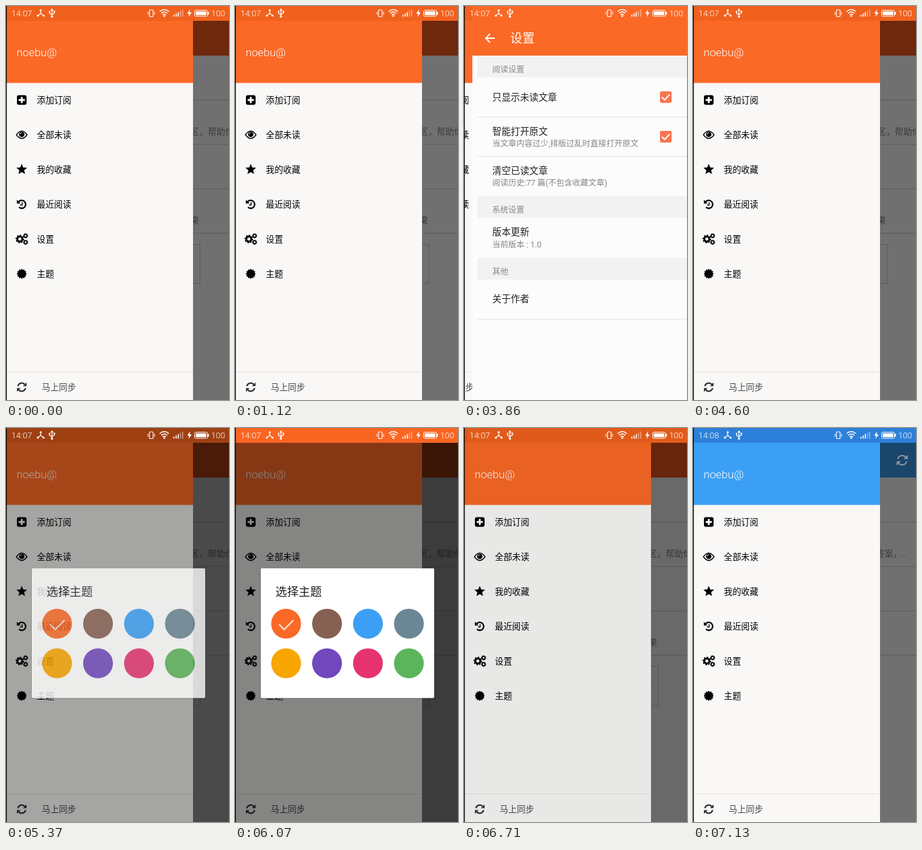
Write an HTML page that moves like this. It is 347 by 612 pixels and loops after 8000 ms.

```html
<!DOCTYPE html>
<html lang="zh-CN">
<head>
<meta charset="utf-8">
<style>
html, body { margin: 0; width: 100%; height: 100%; overflow: hidden; background: #000; }
svg { display: block; }
text { font-family: Roboto, "Noto Sans CJK SC", "Noto Sans CJK", sans-serif; white-space: pre; }
</style>
</head>
<body>
<svg id="stage" width="347" height="612" viewBox="0 0 347 612"></svg>
<script>
const rect = (x, y, w, h, fill, more = '') =>
  `<rect x="${x}" y="${y}" width="${w}" height="${h}" fill="${fill}" ${more}/>`;
const text = (x, y, size, fill, s, more = '') =>
  `<text x="${x}" y="${y}" font-size="${size}" fill="${fill}" ${more}>${s}</text>`;
const disc = (x, y, r, fill) => `<circle cx="${x}" cy="${y}" r="${r}" fill="${fill}"/>`;
const line = (d, color, width, more = '') =>
  `<path d="${d}" fill="none" stroke="${color}" stroke-width="${width}" ${more}/>`;
const shape = (d, fill) => `<path d="${d}" fill="${fill}"/>`;
const at = (x, y, body, more = '') => `<g transform="translate(${x} ${y}) ${more}">${body}</g>`;
const group = (id, body) => `<g id="${id}">${body}</g>`;

// Star with n tips
function burst(n, outer, inner) {
  let d = '';
  for (let i = 0; i < 2 * n; i++) {
    const a = Math.PI * i / n, r = i % 2 ? inner : outer;
    d += `${i ? 'L' : 'M'}${(r * Math.sin(a)).toFixed(2)} ${(-r * Math.cos(a)).toFixed(2)}`;
  }
  return shape(d + 'Z', '#000');
}

const gear = (x, y, r) => at(x, y,
  `<g fill="none" stroke="#000"><circle r="${r * .6}" stroke-width="${r * .46}"/>
  <circle r="${r * .87}" stroke-width="${r * .3}" pathLength="16" stroke-dasharray="1 1"/></g>`);

function refresh(color, width) {
  const half = line('M-6 -1.5A6.2 6.2 0 0 1 4.7 -4.2', color, width) +
    shape('M7.5 -7.3V-1.5H1.7Z', color);
  return half + `<g transform="rotate(180)">${half}</g>`;
}

const icons = [
  rect(-7.5, -7.5, 15, 15, '#000', 'rx="3"') + line('M-4.8 0H4.8M0 -4.8V4.8', '#fff', 2.8),
  line('M-8.3 0Q0 -11.5 8.3 0Q0 11.5 -8.3 0Z', '#000', 1.4) + disc(0, -.6, 4.2, '#000') +
    line('M-2.3 -.8A2.4 2.4 0 0 1 0 -3', '#fff', 1),
  burst(5, 8.8, 3.9),
  line('M-5.2 -3.4A6.2 6.2 0 1 1 -4.4 4.5', '#000', 2.3) + shape('M-7.6 -7V-1.2H-1.8Z', '#000') +
    line('M.6 -3.3V1H-2.6', '#000', 1.4),
  gear(-3, 0, 6.6) + gear(6, -5, 3.9) + gear(6, 5, 3.9),
  burst(12, 8, 6.2)
];
const labels = ['添加订阅', '全部未读', '我的收藏', '最近阅读', '设置', '主题'];

function home(theme) {
  const edge = [146, 215, 284, 353].map(y => rect(291, y - .5, 56, 1, '#5a5a5a')).join('');
  const rows = labels.map((s, i) =>
    at(24.5, 146 + 54 * i, icons[i]) + text(48, 151 + 54 * i, 13.4, '#000', s)).join('');
  return rect(0, 0, 347, 612, '#707070') + rect(0, 23, 347, 54, theme.dark) + edge + theme.extra +
    rect(0, 0, 347, 23, theme.status) +
    rect(0, 23, 291, 589, '#f9f8f6') + rect(0, 23, 291, 96.5, theme.main) +
    text(16.5, 78, 17.2, '#fff', 'noebu@', 'font-weight="300"') +
    (theme.press || '') + rows + rect(0, 568, 291, 1, '#e3e2e0') +
    at(24.5, 592, refresh('#333', 2.3)) + text(55.5, 597, 13.4, '#444', '马上同步');
}

const orange = {
  main: '#fb6926', status: '#f0611d', dark: '#6e280c',
  press: `<rect id="press" x="0" width="291" height="54" fill="#d9d8d6"/>`,
  extra: text(287, 200, 13.5, '#3c3c3c', '区，帮助你') + text(287, 338, 13.5, '#3c3c3c', '果') +
    rect(240.5, 370.5, 61.5, 60.5, 'none', 'stroke="#5a5a5a"') + rect(291, 400, 3, 1, '#5a5a5a')
};
const blue = {
  main: '#3ba0f5', status: '#2d80d9', dark: '#1a466b',
  extra: at(325.5, 50, refresh('#8f979e', 1.6), 'scale(1.15)') +
    text(284.5, 200, 13.5, '#3c3c3c', '答案，..')
};

function settings() {
  const band = (y, s) => rect(9, y, 332, 34, '#f2f2f2') + text(32, y + 25.5, 12.5, '#888', s);
  const title = (y, s) => text(32, y, 14.4, '#212121', s);
  const note = (y, s) => text(32, y, 12.5, '#858585', s);
  const rule = y => rect(9, y - .5, 332, 1, '#e2e2e2');
  const check = y => rect(293, y, 18, 18, '#f9744f', 'rx="2"') +
    line(`M296 ${y + 9}l4.2 4.3l8 -8.4`, '#fff', 2);
  return rect(1, 0, 347, 612, '#fcfcfc') + rect(1, 0, 347, 77, '#fb6926') +
    line('M36 50H22M28.5 43.3L21.8 50L28.5 56.7', '#fff', 2) + text(60, 57, 19, '#fff', '设置') +
    band(77, '阅读设置') + title(146.5, '只显示未读文章') + check(132.5) + rule(172.5) +
    title(199.5, '智能打开原文') + note(217.7, '当文章内容过少,排版过乱时直接打开原文') +
    check(194) + rule(233.5) +
    title(260.5, '清空已读文章') + note(278.7, '阅读历史:77 篇(不包含收藏文章)') +
    band(295, '系统设置') + title(355.5, '版本更新') + note(374.7, '当前版本 : 1.0') +
    band(391, '其他') + title(460, '关于作者') + rule(486.5);
}

function dialog() {
  const colors = ['#fb6926', '#866052', '#3ba0f5', '#6b8795',
    '#faa600', '#7148bd', '#e6336f', '#5db55b'];
  return rect(39, 219, 272, 202, '#000', 'rx="3" opacity=".2"') +
    rect(40, 218, 270, 201.5, '#fff', 'rx="2"') + text(63, 260.5, 18, '#212121', '选择主题') +
    colors.map((c, i) => disc(79.5 + 63.7 * (i % 4), i < 4 ? 304 : 365.5, 23.2, c)).join('') +
    line('M68.5 305L76.5 313L91 298.5', '#fde3d6', 2.3);
}

function statusBar() {
  const bars = [0, 1, 2, 3, 4].map(i =>
    rect(260.5 + 3.4 * i, 13.5 - 2 * i, 1.6, 3 + 2 * i, '#fff', `opacity="${i < 3 ? 1 : .45}"`)).join('');
  return text(8.5, 16, 13.2, '#fff', '14:07', 'id="clock" font-weight="300"') +
    line('M54 7V11.5L49.5 15M54 11.5L58.5 15', '#fff', 1.3) +
    disc(54, 6.5, 1.6, '#fff') + disc(49.5, 15, 1.6, '#fff') + disc(58.5, 15, 1.6, '#fff') +
    line('M71.5 6V17M67.8 8.5V11.5L71.5 14M75.2 8V11L71.5 13.5', '#fff', 1.3) +
    shape('M71.5 3.5L73.8 7H69.2Z', '#fff') + disc(71.5, 16.5, 1.7, '#fff') +
    disc(67.8, 8.7, 1.3, '#fff') + rect(74, 7.3, 2.4, 2.4, '#fff') +
    rect(223.3, 6, 5.6, 10.5, 'none', 'rx="1" stroke="#fff" stroke-width="1.2"') +
    line('M221 9V13.5M231.2 9V13.5', '#fff', 1) +
    line('M239 8.7Q246.3 2.5 253.6 8.7M241.3 11.3Q246.3 7.2 251.3 11.3M243.6 13.8Q246.3 11.6 249 13.8',
      '#fff', 1.4) + disc(246.3, 15.7, 1.4, '#fff') + bars +
    shape('M286.5 5L282 12H285L283.8 17L289 10H285.8Z', '#fff') +
    rect(293.5, 6.5, 20, 9.5, 'none', 'rx="2" stroke="#fff"') +
    rect(295.3, 8.3, 16.4, 5.9, '#fff', 'rx="1"') + rect(314, 9, 1.6, 4.5, '#fff') +
    text(319.3, 16, 13, '#fff', '100', 'font-weight="300"');
}

const stage = document.getElementById('stage');
stage.innerHTML = group('home', home(orange)) + group('scrim', rect(0, 0, 347, 612, '#000')) +
  group('top', rect(0, 0, 347, 23, '#fa6521')) + group('dialog', dialog()) +
  group('blue', home(blue)) + group('settings', settings()) + statusBar() +
  rect(0, 0, 1.2, 612, '#000');

const el = id => document.getElementById(id);
const [main, scrim, top_, box, next, page, press, clock] =
  ['home', 'scrim', 'top', 'dialog', 'blue', 'settings', 'press', 'clock'].map(el);
const clamp = v => Math.max(0, Math.min(1, v));
const span = (t, a, b) => clamp((t - a) / (b - a));
const within = (t, a, b) => t >= a && t < b;
const fade = (node, v) => node.setAttribute('opacity', v);
const slide = (node, x) => node.setAttribute('transform', `translate(${x.toFixed(2)} 0)`);

function draw(t) {
  // Settings page: 347 is off stage, 0 is fully open
  let x = 347;
  if (within(t, 1530, 3860)) x = 347 * (1 - span(t, 1490, 1770)) ** 2;
  if (within(t, 3860, 4600)) {
    const p = span(t, 3860, 4600);
    x = 12 + 335 * p * p * (3 - 2 * p);
  }
  slide(page, x);
  slide(main, -97 * (1 - x / 347));
  fade(page, x < 347 ? 1 : 0);

  const tapSettings = within(t, 880, 1120);
  press.setAttribute('y', tapSettings ? 335 : 389);
  fade(press, tapSettings || within(t, 5020, 5200) ? 1 : 0);

  const shown = span(t, 5080, 5480);
  const gone = t < 6430 ? 0 : span(t, 6370, 6770);
  fade(scrim, .465 * shown * (1 - gone));
  fade(top_, within(t, 5480, 6430) ? 1 : 0);
  fade(box, clamp(shown * 1.5 - .3) * clamp(1 - gone * 1.5));

  fade(next, t < 6950 ? 0 : span(t, 6900, 7130));
  clock.textContent = t < 6950 ? '14:07' : '14:08';
}

const start = performance.now();
function tick() {
  draw((performance.now() - start) % 8000);
  requestAnimationFrame(tick);
}
tick();
</script>
</body>
</html>
```
